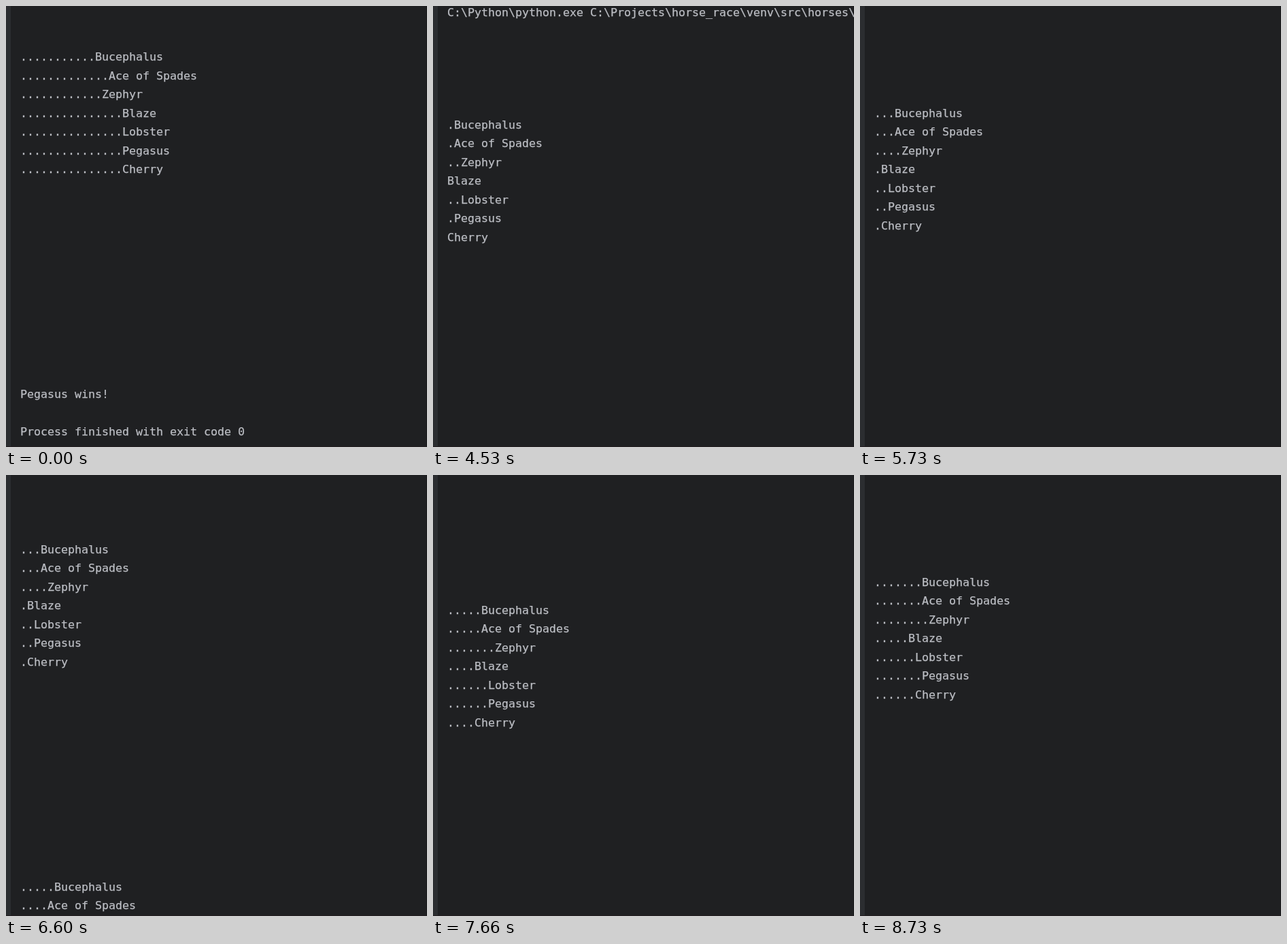
An HTML page for the animation above (9660 ms loop, 619 by 647 pixels).

```html
<!DOCTYPE html>
<html lang="en">
<head>
<meta charset="utf-8">
<title>Console horse race</title>
<style>
  html, body { margin: 0; width: 100%; height: 100%; overflow: hidden; background: #1f2022; }
  svg { display: block; width: 619px; height: 647px; }
  text {
    font: 16.61px "DejaVu Sans Mono", "Noto Sans Mono", monospace;
    fill: #bcbec4; stroke: #bcbec4; stroke-width: .25px; white-space: pre;
  }
</style>
</head>
<body>
<svg viewBox="0 0 619 647">
  <rect width="619" height="647" fill="#1f2022"/>
  <rect width="7" height="647" fill="#2b2d30"/>
  <rect x="618" width="1" height="647" fill="#1a1b1d"/>
  <rect y="646" width="619" height="1" fill="#241e21"/>
  <g id="out"></g>
</svg>
<script>
const LOOP = 9660, TICK = 1000 / 15;
const ROW = 27.5, CYCLE = 18 * ROW, REST = 162.5, SCROLL = 120;
const CLEAR = 4330, RUN = 4530;
const command = 'C:\\Python\\python.exe C:\\Projects\\horse_race\\venv\\src\\horses\\main.py';

// Each horse: name, stride in every turn, dots at the finish
const horses = [
  ['Bucephalus', '12202', 11],
  ['Ace of Spades', '12112', 13],
  ['Zephyr', '22121', 12],
  ['Blaze', '01211', 15],
  ['Lobster', '20310', 15],
  ['Pegasus', '11221', 15],
  ['Cherry', '01122', 15]
];

// Moments when turns two to five are printed
const prints = [5585.1, 6596, 7592.5, 8599.2];

const out = document.getElementById('out');

function line(str, y) {
  const base = Math.round(y);
  if (base < -4 || base > 660) return;
  const el = document.createElementNS('http://www.w3.org/2000/svg', 'text');
  el.setAttribute('x', 21);
  el.setAttribute('y', base);
  el.textContent = str;
  out.appendChild(el);
}

function block(y, dots) {
  horses.forEach((h, i) => line('.'.repeat(dots(h)) + h[0], y + i * ROW));
}

// Dots of a horse after the given turn
const run = turn => ([, strides]) =>
  [...strides.slice(0, turn + 1)].reduce((sum, s) => sum + +s, 0);

function drawFinish() {
  block(80, h => h[2]);
  line('Pegasus wins!', 80 + CYCLE);
  line('Process finished with exit code 0', 80 + CYCLE + 2 * ROW);
}

function drawRace(t) {
  const turn = prints.filter(p => p <= t).length;
  if (turn === 0) {
    block(REST + 17, run(0));
    line(command, REST + 17 - 6 * ROW);
    return;
  }
  const left = Math.max(0, 1 - (t - prints[turn - 1]) / SCROLL);
  const y = REST + CYCLE * left ** 3;
  block(y - CYCLE, run(turn - 1));
  block(y, run(turn));
}

// The screen refreshes 15 times a second, on whole hundredths
function refresh(t) {
  const n = Math.floor((Math.floor(t / 10) * 10 + 6.7) / TICK);
  return Math.floor(n * TICK / 10 + 1e-6) * 10;
}

let shown = -1;

function render(time) {
  const t = refresh(time);
  if (t === shown) return;
  shown = t;
  out.replaceChildren();
  if (t < CLEAR) drawFinish();
  else if (t >= RUN) drawRace(t);
}

const start = performance.now();

function tick() {
  render((performance.now() - start) % LOOP);
  requestAnimationFrame(tick);
}
tick();
</script>
</body>
</html>
```
